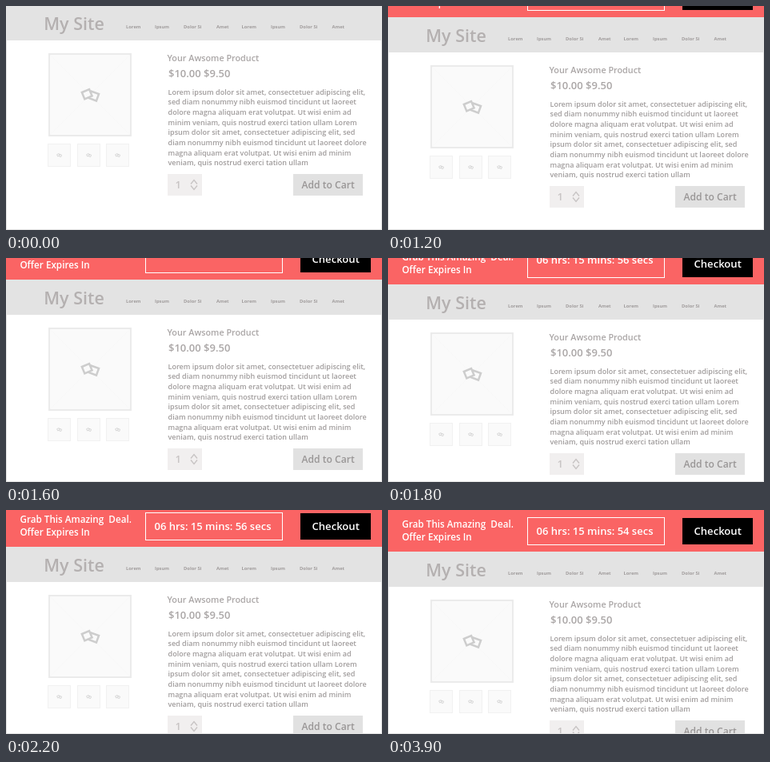
Recreate the animation shown at these times as an HTML page with a canvas. Size 470 px wide and 280 px high, loop 4.9 s.

```html
<!DOCTYPE html>
<html lang="en">
<head>
<meta charset="utf-8">
<title>Product page with countdown bar</title>
<style>
  html, body { margin: 0; width: 100%; height: 100%; overflow: hidden; background: #fff; }
  canvas { display: block; width: 470px; height: 280px; }
</style>
</head>
<body>
<canvas id="stage" width="470" height="280"></canvas>
<script>
const ctx = document.getElementById('stage').getContext('2d');
const LOOP = 4900, OPEN = 53;
const GREY = '#e3e3e3', RED = '#fa6464', INK = '#a09c9c';

const NAV = [['Lorem', 150], ['Ipsum', 186], ['Dolor Si', 222], ['Amet', 263],
             ['Lorem', 294.5], ['Ipsum', 331], ['Dolor Si', 367], ['Amet', 407.5]];
const COPY = [
  'Lorem ipsum dolor sit amet, consectetuer adipiscing elit,',
  'sed diam nonummy nibh euismod tincidunt ut laoreet',
  'dolore magna aliquam erat volutpat. Ut wisi enim ad',
  'minim veniam, quis nostrud exerci tation ullam Lorem',
  'ipsum dolor sit amet, consectetuer adipiscing elit, sed',
  'diam nonummy nibh euismod tincidunt ut laoreet dolore',
  'magna aliquam erat volutpat. Ut wisi enim ad minim',
  'veniam, quis nostrud exerci tation ullam'
];

function rect(x, y, w, h, color) {
  ctx.fillStyle = color;
  ctx.fillRect(x, y, w, h);
}

function text(str, x, y, size, color, weight = 600) {
  ctx.font = `${weight} ${size}px "Open Sans", sans-serif`;
  ctx.fillStyle = color;
  ctx.fillText(str, x, y);
}

function framed(x, y, size, line, edge, fill) {
  rect(x, y, size, size, edge);
  rect(x + line, y + line, size - 2 * line, size - 2 * line, fill);
}

function path(points, width, color) {
  ctx.beginPath();
  for (const [x, y] of points) ctx.lineTo(x, y);
  ctx.strokeStyle = color;
  ctx.lineWidth = width;
  ctx.stroke();
}

// Two overlapping tilted photo cards
function photoIcon(x, y, scale, fill) {
  ctx.save();
  ctx.translate(x, y);
  ctx.scale(scale, scale);
  ctx.strokeStyle = '#cdcdcd';
  ctx.fillStyle = fill;
  ctx.lineWidth = 2.5;
  for (const [cx, cy, angle] of [[4.8, 1.6, 0.35], [-3.8, -0.8, -0.4]]) {
    ctx.save();
    ctx.translate(cx, cy);
    ctx.rotate(angle);
    ctx.fillRect(-5, -4.5, 10, 9);
    ctx.strokeRect(-5, -4.5, 10, 9);
    ctx.restore();
  }
  ctx.restore();
}

function chevron(x, y, dy) {
  path([[x - 4, y], [x, y + dy], [x + 4, y]], 1.4, '#c8c4c4');
}

function drawSite() {
  rect(0, -1, 470, 44, GREY);
  text('My Site', 47.2, 30, 21.5, '#b4b0b0');
  for (const [label, x] of NAV) text(label, x, 28, 5.8, INK, 700);

  framed(53, 59, 104, 2, '#ebebeb', '#fafafa');
  path([[55, 61], [155, 161]], 1, '#f8f8f8');
  path([[155, 61], [55, 161]], 1, '#f8f8f8');
  photoIcon(105, 111, 1, '#fafafa');
  for (const x of [52, 89, 125]) {
    framed(x, 172, 29, 1, '#f1f1f1', '#fafafa');
    photoIcon(x + 14.5, 186.5, 0.28, '#fafafa');
  }

  text('Your Awsome Product', 201.5, 69, 10.8, '#aaa6a6');
  text('$10.00 $9.50', 203, 89, 13, '#aaa6a6');
  COPY.forEach((line, i) => text(line, 202.5, Math.round(110.8 + 12.65 * i), 9.04, INK));

  rect(202, 210, 43, 27, '#f1efef');
  text('1', 211.5, 228, 13, '#c8c4c4');
  chevron(235, 222.5, -5);
  chevron(235, 224.5, 5);
  rect(359, 210, 87, 27, '#e1e1e1');
  text('Add to Cart', 369.5, 228, 12.1, '#999696');
}

function drawBanner(secs, lag) {
  rect(0, 0, 470, OPEN - 1, RED);
  text('Grab This Amazing\u00a0 Deal.', 17.4, 22, 11.7, '#fff');
  text('Offer Expires In', 17.4, 38, 11.7, '#fff');
  ctx.strokeStyle = '#fff';
  ctx.lineWidth = 1;
  ctx.strokeRect(174.5, 9.5, 171, 34);
  text(`06 hrs: 15 mins: ${secs} secs`, 185.5, 31 - lag, 13, '#fff');
  rect(368, 10, 88, 33, '#000');
  text('Checkout', 382.5, 31, 13.1, '#fff');
}

// The bar slides down in eight steps of 200 ms
const stepAt = t => Math.min(7, Math.floor((t - 1000) / 200));
const shiftAt = t => t < 1000 ? 0 : Math.round(9 + stepAt(t) * 44 / 7);

// The countdown starts higher and settles one step early
const lagAt = t => Math.round(Math.max(0, 6 - stepAt(t)) * 2.5);

function draw(t) {
  const shift = shiftAt(t);
  const secs = t < 2900 ? 56 : t < 3900 ? 55 : 54;
  rect(0, 0, 470, 280, '#fff');

  ctx.save();
  ctx.translate(0, shift);
  drawSite();
  ctx.restore();

  rect(0, 43, 1, 237, GREY);
  rect(469, 43, 1, 237, GREY);
  rect(0, 279, 470, 1, GREY);

  if (shift) {
    ctx.save();
    ctx.translate(0, shift - OPEN);
    drawBanner(secs, lagAt(t));
    ctx.restore();
  }
}

const start = performance.now();
function tick() {
  draw((performance.now() - start) % LOOP);
  requestAnimationFrame(tick);
}
draw(0);
requestAnimationFrame(tick);
</script>
</body>
</html>
```
